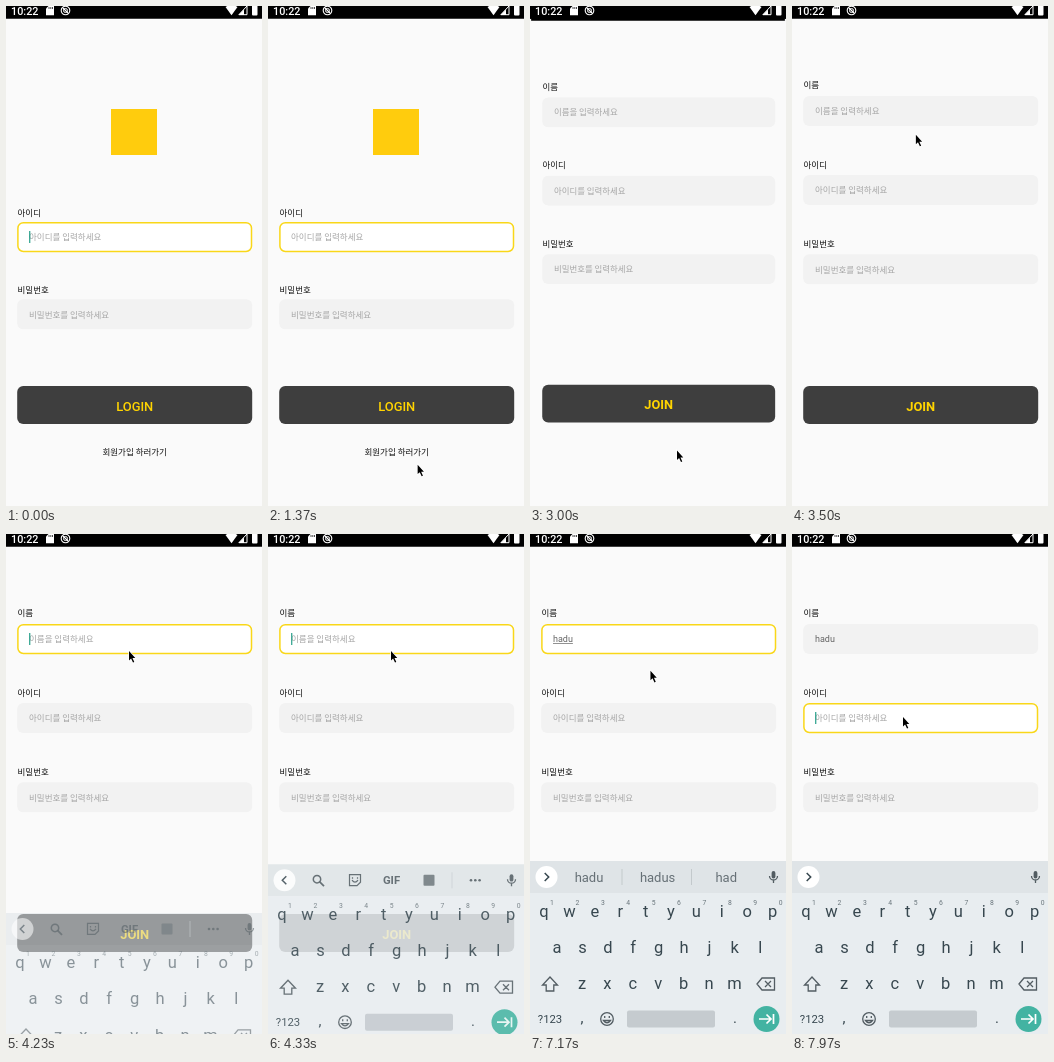
An HTML page with a canvas for the animation above (8 s loop, 256x500 px).

```html
<!DOCTYPE html>
<html lang="ko">
<head>
<meta charset="utf-8">
<style>
html, body { margin: 0; width: 100%; height: 100%; overflow: hidden; background: #fafafa; }
canvas { display: block; }
</style>
</head>
<body>
<canvas id="stage" width="256" height="500"></canvas>
<script>
const ctx = document.getElementById('stage').getContext('2d');
const LOOP = 8000;
const KOREAN = '8.5px "Noto Sans CJK KR", "Noto Sans CJK", sans-serif';
const YELLOW = '#ffd400', INK = '#37474f', ICON = '#525c62';

const roboto = (size, weight = 400) => `${weight} ${size}px Roboto, sans-serif`;
const clamp = v => Math.min(1, Math.max(0, v));
const easeOut = (t, power) => 1 - (1 - clamp(t)) ** power;
const within = (t, spans) => spans.some(([from, to]) => t >= from && t < to);
const latest = (t, steps) => steps.reduce((value, [at, next]) => t >= at ? next : value, '');

function text(str, x, y, font, color, align = 'left') {
  ctx.font = font;
  ctx.fillStyle = color;
  ctx.textAlign = align;
  ctx.fillText(str, x, y);
}

function rect(x, y, w, h, color, radius = 0, stroke) {
  ctx.beginPath();
  ctx.roundRect(x, y, w, h, radius);
  ctx.fillStyle = color;
  ctx.fill();
  if (stroke) {
    ctx.strokeStyle = stroke;
    ctx.lineWidth = 1.5;
    ctx.stroke();
  }
}

function disc(x, y, r, color) {
  rect(x - r, y - r, 2 * r, 2 * r, color, r);
}

// Path data is relative to (x, y); a line width of 0 means filled.
function icon(x, y, path, color = ICON, width = 1.3) {
  const shape = new Path2D(path);
  ctx.save();
  ctx.translate(x, y);
  ctx.fillStyle = ctx.strokeStyle = color;
  ctx.lineWidth = width;
  if (width) ctx.stroke(shape); else ctx.fill(shape);
  ctx.restore();
}

const ring = r => `M${-r} 0a${r} ${r} 0 1 0 ${2 * r} 0a${r} ${r} 0 1 0 ${-2 * r} 0`;

// ---- Screens ----
const typedAt = [[4970, 'h'], [5030, 'ha'], [5130, 'had'], [5330, 'hadu'], [5870, 'hadun'], [6600, 'hadu']];
const suggestionsAt = [
  [4970, 'h he her'], [5030, 'ha has have'], [5130, 'had hand has'], [5330, 'hadu hadus had'],
  [5930, 'hadun had hand'], [6630, 'hadu hadus had'], [7970, '']
];
const caretOff = [
  [270, 770], [1270, 1770], [4370, 4830], [5830, 5870], [6400, 6600], [7100, 7600]
];
const FOCUS_NAME = 3900, FOCUS_ID = 7870;

function field(label, hint, labelY, top, focused, t, value = '') {
  text(label, 11.5, labelY, KOREAN, '#111');
  if (focused) rect(11.9, top + .7, 233.6, 28.8, '#fff', 5.5, '#f9d719');
  else rect(11.2, top, 235, 30, '#f2f2f2', 6);
  let caretX = 23.2;
  if (value) {
    text(value, 23, top + 18, roboto(9), '#666');
    const width = ctx.measureText(value).width;
    caretX += width;
    if (focused) rect(23, top + 19, width, .8, '#777');
  } else {
    text(hint, 23, top + 18.2, KOREAN, '#a6a6a6');
  }
  if (focused && !within(t, caretOff)) rect(caretX, top + 9, 1.1, 12, '#12967f');
}

function button(label, weight) {
  rect(11.2, 380, 235, 38, '#3e3e3e', 6);
  text(label, 128.7, 404.7, roboto(12.9, weight), YELLOW, 'center');
}

function page() {
  rect(0, 0, 256, 500, '#fafafa');
  rect(0, 0, 256, 12.7, '#000');
}

function loginPage(t) {
  page();
  rect(105, 103, 46, 46, '#ffcc0d');
  field('아이디', '아이디를 입력하세요', 210, 216, true, t);
  field('비밀번호', '비밀번호를 입력하세요', 287.4, 293.3, false, t);
  button('LOGIN', 500);
  text('회원가입 하러가기', 128.7, 449, KOREAN, '#111', 'center');
}

function joinPage(t) {
  page();
  field('이름', '이름을 입력하세요', 82.3, 90, t >= FOCUS_NAME && t < FOCUS_ID, t, latest(t, typedAt));
  field('아이디', '아이디를 입력하세요', 161.6, 169, t >= FOCUS_ID, t);
  field('비밀번호', '비밀번호를 입력하세요', 240.8, 248.3, false, t);
  button('JOIN', 700);
}

function scaled(scale, alpha, draw) {
  ctx.save();
  ctx.globalAlpha = alpha;
  ctx.translate(128, 250);
  ctx.scale(scale, scale);
  ctx.translate(-128, -250);
  draw();
  ctx.restore();
}

function screens(t) {
  const progress = (t - 2670) / 720;
  if (progress <= 0) return loginPage(t);
  if (progress >= 1) return joinPage(t);
  const eased = easeOut(progress, 4.6);
  const fade = clamp((progress - .08) / .14);
  page();
  if (fade < 1) scaled(1 + .15 * eased, 1, () => loginPage(t));
  scaled(.85 + .15 * eased, fade, () => joinPage(t));
  rect(0, 0, 256, 12.7, '#000');
}

function statusBar() {
  text('10:22', 5, 8.8, roboto(10.8, 500), '#fff');
  icon(40, 0, 'M2.5 0H8V9.3H0V2.5Z', '#fff', 0);
  icon(41.5, 1, 'M1.5 0V2M3.3 0V2M5 0V2', '#000', .7);
  icon(59.5, 4.5, ring(4.3), '#fff', 1.1);
  icon(59.5, 4.5, ring(2), '#fff', 1);
  icon(59.5, 4.5, 'M-2.5 -2.5L2.5 2.5', '#fff', 1.2);
  icon(225.5, 0, 'M-6 1Q0 -3 6 1L0 9.3Z', '#fff', 0);
  icon(232, 0, 'M9 0V8.7H.9Z', '#fff', 1);
  icon(232, 0, 'M6 3.5V9H.5Z', '#fff', 0);
  rect(246, 0, 5.5, 9.5, '#fff', [0, 0, 1, 1]);
}

// ---- Keyboard ----
function keyRow(letters, x, y) {
  [...letters].forEach((letter, i) => text(letter, x + i * 25.4, y, roboto(16.5), INK, 'center'));
}

function toolbar(t) {
  rect(0, 327, 256, 32, '#dfe4e7');
  disc(16.5, 343, 11, '#fff');
  icon(243.5, 343, 'M-1.9 -4a1.9 1.9 0 0 1 3.8 0v3.5a1.9 1.9 0 0 1 -3.8 0Z', ICON, 0);
  icon(243.5, 343, 'M-4 -1a4 4 0 0 0 8 0M0 3V6');
  if (t >= 4970) {
    icon(16.5, 343, 'M-1.8 -4L2.2 0L-1.8 4', INK, 1.5);
    const words = latest(t, suggestionsAt);
    if (!words) return;
    words.split(' ').forEach((word, i) => text(word, 59 + i * 68.6, 347.5, roboto(13), '#667076', 'center'));
    rect(91.5, 335, 1, 16, '#c3c9cc');
    rect(161, 335, 1, 16, '#c3c9cc');
    return;
  }
  icon(16.5, 343, 'M1.8 -4L-2.2 0L1.8 4', INK, 1.5);
  icon(49, 342, ring(3.7), ICON, 1.5);
  icon(49, 342, 'M2.7 2.7L7 7', ICON, 1.7);
  icon(87, 343, 'M-5.5 -5.5H5.5V2L2 5.5H-5.5ZM-3 0Q0 4 3 0M-2.5 -3V-1.5M2.5 -3V-1.5', ICON, 1.2);
  text('GIF', 123.5, 347, roboto(11.3, 700), ICON, 'center');
  rect(155.5, 337.5, 11, 11, '#6f787d', 1);
  rect(183.5, 335, 1, 16, '#cdd3d6');
  for (const x of [203, 207.3, 211.6]) disc(x, 343, 1.3, ICON);
}

function keyboard(t) {
  if (t < 4230) return;
  const progress = clamp((t - 4230) / 200);
  ctx.save();
  ctx.globalAlpha = 1 - .45 * (1 - progress) ** 1.6;
  ctx.translate(0, 53 * (1 - easeOut(progress, 4)));
  rect(0, 359, 256, 141, '#e8edf0');
  toolbar(t);
  keyRow('qwertyuiop', 14, 382.5);
  [...'1234567890'].forEach((n, i) => text(n, 22 + i * 25.4, 370.5, roboto(6.8), '#69757b', 'center'));
  keyRow('asdfghjkl', 27, 418.5);
  keyRow('zxcvbnm', 52, 455);
  icon(20, 450, 'M0 -7L7.5 1H3.8V7H-3.8V1H-7.5Z');
  icon(236, 450, 'M-9 0L-4 -6H8.5V6H-4ZM-1 -3L5 3M5 -3L-1 3');
  text('?123', 20, 489, roboto(11.3), INK, 'center');
  text(',', 52, 489, roboto(15), INK, 'center');
  icon(77, 485, ring(6.3));
  icon(77, 485, 'M-3.5 1.5Q0 6 3.5 1.5ZM-2.3 -3V-1M2.3 -3V-1');
  rect(97, 476.5, 88, 17, '#c5cbcf', 2);
  text('.', 205, 489, roboto(15), INK, 'center');
  disc(236.5, 485, 13, '#43b3a2');
  icon(236.5, 485, 'M-7.5 0H4M0 -4.5L4.5 0L0 4.5M7 -5V5', '#fff', 1.7);
  ctx.restore();
}

// ---- Pointer: [start, end, x, y] ----
const moves = [
  [1200, 1730, 147, 444.5],
  [3030, 3670, 123, 117],
  [7130, 7500, 113, 195],
  [7500, 7800, 111, 183]
];

function pointer(t) {
  if (t < 1200) return;
  let x = 154, y = 482;
  for (const [start, end, toX, toY] of moves) {
    const k = easeOut((t - start) / (end - start), 2.5);
    x += (toX - x) * k;
    y += (toY - y) * k;
  }
  const arrow = 'M0 0V9.4L2.1 7.5L4 11.6L5.3 11L3.5 7H6.3Z';
  icon(x, y, arrow, '#fff', 1.4);
  icon(x, y, arrow, '#000', 0);
}

function frame() {
  const t = performance.now() % LOOP;
  screens(t);
  keyboard(t);
  statusBar();
  pointer(t);
  requestAnimationFrame(frame);
}
frame();
</script>
</body>
</html>
```
